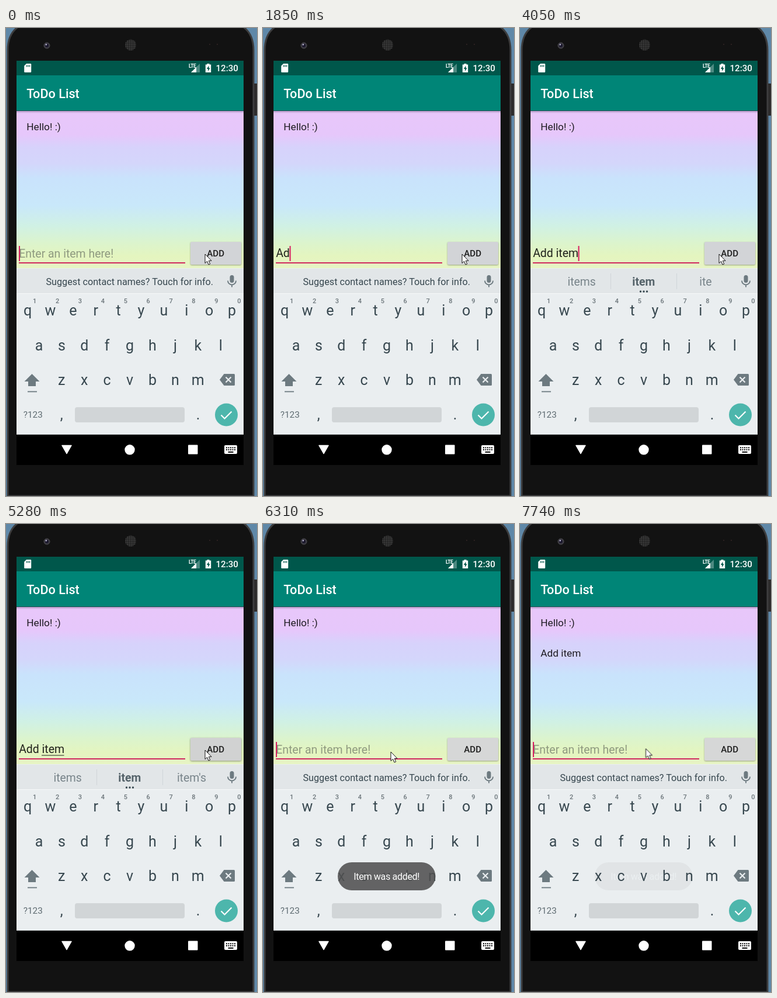
These frames come from a looping animation (430x801 px, 8 s). An HTML page:

```html
<!DOCTYPE html>
<html lang="en">
<head>
<meta charset="utf-8">
<title>ToDo List</title>
<style>
html, body { margin: 0; width: 100%; height: 100%; overflow: hidden; background: #111; }
body { position: relative; font-family: Roboto, sans-serif; }
svg { display: block; }
svg text { font-family: Roboto, sans-serif; }
.mid { text-anchor: middle; }
.med { font-weight: 500; }
.key { font-size: 25px; fill: #37474f; text-anchor: middle; }
.num { font-size: 11px; font-weight: 500; fill: #6a7479; text-anchor: middle; }
.item { font-size: 17.3px; fill: #1f1c22; }
.word { font-size: 19.4px; fill: #78848a; text-anchor: middle; }
.word.best { font-weight: 700; fill: #55636a; }
.icon { fill: #6d7a80; }

.hint, .typed, .caret, .under, .reel, .added, .mouse, .toast, .button {
  animation: 8s step-end infinite;
}
.hint { animation-name: hint; font-size: 19.45px; fill: #8f9a80; }
.typed {
  animation-name: type;
  position: absolute; left: 22.2px; top: 371.4px; height: 30px;
  font-size: 19.45px; line-height: 30px; color: #20221c;
  white-space: pre; overflow: hidden;
}
.caret { animation-name: caret, blink; fill: #d81b60; }
.under { animation-name: under; fill: #30332a; }
.reel { animation-name: reel; }
.added { animation-name: added; }
.mouse { animation-name: mouse; }
.toast { animation-name: toast; }
.button { animation-name: press; }

@keyframes hint {
  0%, 71% { opacity: 1; }
  15.875% { opacity: 0; }
}
@keyframes type {
  0%, 71%, 100% { width: 0; }
  15.875% { width: 12.7px; }
  19.625% { width: 23.7px; }
  25% { width: 34.7px; }
  35.25% { width: 44.2px; }
  38.25% { width: 50.5px; }
  42% { width: 60.9px; }
  48.75% { width: 80px; }
}
@keyframes caret {
  0%, 71%, 100% { transform: none; }
  15.875% { transform: translateX(12.6px); }
  19.625% { transform: translateX(23.5px); }
  25% { transform: translateX(34.6px); }
  31.875% { transform: translateX(39.4px); }
  35.25% { transform: translateX(44.1px); }
  38.25% { transform: translateX(50.2px); }
  42% { transform: translateX(60.8px); }
  48.75% { transform: translateX(77.6px); }
}
@keyframes blink {
  0%, 12.375%, 67.5%, 94.875%, 100% { opacity: 1; }
  7%, 56%, 86.875% { opacity: 0; }
}
@keyframes under {
  0%, 23.125%, 33.75%, 38.25%, 45.375%, 50.625%, 71%, 100% { transform: scaleX(0); }
  15.875% { transform: translateX(22px) scaleX(12.5); }
  21.25% { transform: translateX(22px) scaleX(23.5); }
  30% { transform: translateX(22px) scaleX(34); }
  36.75% { transform: translateX(61px) scaleX(5); }
  40.125% { transform: translateX(61px) scaleX(11); }
  46.875% { transform: translateX(61px) scaleX(21.5); }
  52.125% { transform: translateX(61px) scaleX(38.5); }
}
@keyframes reel {
  0%, 23.125%, 75.875%, 100% { transform: none; }
  15.875% { transform: translateY(-42px); }
  26.5% { transform: translateY(-84px); }
  33.75% { transform: translateY(-126px); }
  36.75% { transform: translateY(-168px); }
  38.25% { transform: translateY(-210px); }
  43.5% { transform: translateY(-252px); }
  52.125% { transform: translateY(-294px); }
}
@keyframes added {
  0% { opacity: 0; }
  80.375%, 100% { opacity: 1; }
}
@keyframes mouse {
  0% { transform: translate(341px, 387px); }
  74.375% { transform: translate(331px, 389px); }
  75.875% { transform: translate(300px, 392px); }
  77.375% { transform: translate(255px, 392px); }
  78.875% { transform: translate(219px, 390px); }
  80.375%, 100% { transform: translate(215.5px, 384.5px); }
}
@keyframes toast {
  0% { opacity: 0; }
  75.875% { opacity: .4; }
  77.375% { opacity: .8; }
  78.875% { opacity: 1; }
  94.875% { opacity: .55; }
  96.75%, 100% { opacity: .07; }
}
@keyframes press {
  0% { fill: #d2d4d7; filter: drop-shadow(0 1px 1px #0005); }
  66% { fill: #d1d2d2; filter: drop-shadow(0 1.5px 1.5px #0006); }
  67.5% { fill: #cbcccc; filter: drop-shadow(0 2px 2px #0007); }
  75.875%, 100% { fill: #d6d7d7; filter: drop-shadow(0 1px 1px #0005); }
}
</style>
</head>
<body>
<svg width="430" height="801" viewBox="0 0 430 801">
  <defs>
    <linearGradient id="sky" x2="0" y2="1">
      <stop offset="0" stop-color="#e8c7fa"/>
      <stop offset=".15" stop-color="#e6c7fb"/>
      <stop offset=".23" stop-color="#d7d2fb"/>
      <stop offset=".33" stop-color="#d4d6fb"/>
      <stop offset=".43" stop-color="#c9e3fc"/>
      <stop offset=".6" stop-color="#c9e8fa"/>
      <stop offset=".73" stop-color="#d0f1e4"/>
      <stop offset=".84" stop-color="#dcf4cc"/>
      <stop offset=".92" stop-color="#e4f5bf"/>
      <stop offset="1" stop-color="#e7f4c4"/>
    </linearGradient>
    <linearGradient id="shade" x2="0" y2="1">
      <stop stop-color="#403050" stop-opacity=".4"/>
      <stop offset="1" stop-color="#403050" stop-opacity="0"/>
    </linearGradient>
    <pattern id="mesh" width="3" height="3" patternUnits="userSpaceOnUse">
      <rect width="3" height="3" fill="#1b1b1b"/>
      <circle cx="1.5" cy="1.5" r=".9" fill="#565656"/>
    </pattern>
  </defs>

  <!-- phone -->
  <rect width="430" height="801" fill="#5f88a8"/>
  <rect x="424" y="95" width="6" height="55" fill="#2c2b2b"/>
  <path d="M3 801V38Q3 8 24-4H403Q424 8 424 38V801Z" fill="#121212" stroke="#3d3d3e" stroke-width="3"/>
  <circle cx="70" cy="30" r="5" fill="#36343d" stroke="#4c4b50"/>
  <circle cx="70" cy="30" r="2.6" fill="#17142b"/>
  <circle cx="68.8" cy="28.4" r="1.3" fill="#b9b6d2"/>
  <circle cx="213.5" cy="29" r="9.5" fill="url(#mesh)"/>
  <path d="M348 28h2M361 28h2" stroke="#2b2020" stroke-width="2"/>

  <!-- status and title bars -->
  <rect x="18" y="142" width="389" height="270" fill="url(#sky)"/>
  <rect x="18" y="141" width="389" height="5" fill="url(#shade)"/>
  <rect x="18" y="56" width="389" height="26" fill="#00574b"/>
  <rect x="18" y="81" width="389" height="60.5" fill="#008577"/>
  <path d="M35 61h7q1.2 0 1.2 1.2v12.6q0 1.2-1.2 1.2h-9.600q-1.2 0-1.2-1.2v-10z" fill="#fff"/>
  <path d="M35.500 63.500v3M38 63.500v3M40.500 63.500v3" stroke="#00574b" stroke-width="1.3"/>
  <path d="M332 61V76H317Z" fill="#4d8a82"/>
  <path d="M326 67V76H317Z" fill="#fff"/>
  <text x="313" y="67.500" font-size="8.500" fill="#fff" font-weight="700" letter-spacing="-.5">LTE</text>
  <path d="M344.500 61h4v1.500h2.700v13.500h-9.400v-13.500h2.700z" fill="#fff"/>
  <path d="M347.500 64.500l-3.700 5.500h2.300v4l3.500-5.500h-2.100z" fill="#00574b"/>
  <text class="med" x="359.500" y="74.300" font-size="15.1" fill="#fff">12:30</text>
  <text class="med" x="35.200" y="120" font-size="21.6" fill="#fff">ToDo List</text>

  <!-- list and entry row -->
  <text class="item" x="35.200" y="174.500">Hello! :)</text>
  <text class="item added" x="35.200" y="226.500">Add item</text>
  <text class="hint" x="22.200" y="393">Enter an item here!</text>
  <rect class="under" x="0" y="395.400" width="1" height="1.1"/>
  <rect x="22" y="401" width="285" height="2" fill="#d0285f"/>
  <rect class="caret" x="22" y="373" width="2" height="26"/>
  <rect class="button" x="316" y="366" width="87" height="39" rx="2"/>
  <text class="mid med" x="359.200" y="390.500" font-size="15.1" fill="#1c1c1c">ADD</text>

  <!-- keyboard -->
  <rect x="18" y="411" width="389" height="285" fill="#eaeef0"/>
  <rect x="18" y="412" width="389" height="42" fill="#e2e6e8"/>
  <path d="M18 454.500H407" stroke="#f6f8f9"/>
  <path d="M18 695.500H407" stroke="#cfd3d5"/>
  <svg x="0" y="412" width="430" height="42" viewBox="0 0 430 42">
    <g class="reel" id="reel">
      <text x="68.500" y="28" font-size="16.2" fill="#37474f">Suggest contact names? Touch for info.</text>
    </g>
  </svg>
  <rect class="icon" x="383.500" y="423" width="7" height="13" rx="3.500"/>
  <path d="M380 432.500a7 7 0 0 0 14 0M387 439.500v4" fill="none" stroke="#6d7a80" stroke-width="1.9"/>
  <g id="keys"></g>
  <path class="icon" d="M44.500 592L57.500 605H51V613H38V605H31.500Z"/>
  <rect class="icon" x="37" y="621.500" width="16" height="1.800"/>
  <path class="icon" d="M373.500 592H390.500Q392 592 392 593.500V610.500Q392 612 390.500 612H373.500L366 602Z"/>
  <path d="M376.500 597.500l9 9m0-9l-9 9" stroke="#eaeef0" stroke-width="2.2"/>
  <text x="29.800" y="667" font-size="15.300" fill="#5f6c72">?123</text>
  <rect x="118" y="649" width="188" height="26" rx="4" fill="#d1d5d7"/>
  <circle cx="377.500" cy="662" r="19.500" fill="#4db6ac"/>
  <path d="M368.500 662.500l6 6 12-12" fill="none" stroke="#fff" stroke-width="2.2"/>

  <!-- navigation bar -->
  <rect x="18" y="696" width="389" height="52" fill="#000"/>
  <g fill="#fff">
    <path d="M96 714.500H112L104 728.500Z" stroke="#fff" stroke-width="1.5" stroke-linejoin="round"/>
    <circle cx="212" cy="721.800" r="8.700"/>
    <rect x="312" y="713.500" width="16.500" height="16" rx="1"/>
    <rect x="374" y="714" width="22" height="15" rx="2"/>
  </g>
  <path d="M377 718.300H394M377 721.700H394" stroke="#000" stroke-width="2" stroke-dasharray="2 1.500"/>
  <path d="M380.500 725.800H389.500" stroke="#000" stroke-width="2"/>

  <g class="toast">
    <rect x="128" y="579" width="167.500" height="48" rx="24" fill="#505050" fill-opacity=".88"/>
    <text class="mid" x="211.700" y="609" font-size="16.2" letter-spacing="-.4" fill="#fff">Item was added!</text>
  </g>
  <path class="mouse" d="M0 0V15.500L3.600 12.200L6 18L8.700 16.900L6.300 11.300H11Z" fill="#fff" stroke="#111" stroke-linejoin="round"/>
</svg>
<div class="typed">Add item</div>

<script>
const NS = "http://www.w3.org/2000/svg";
const PITCH = 38.9, ROW = 42;

function add(parent, tag, attrs, text = "") {
  const el = document.createElementNS(NS, tag);
  for (const name in attrs) el.setAttribute(name, attrs[name]);
  el.textContent = text;
  parent.append(el);
}

const keys = document.getElementById("keys");
function keyRow(chars, x, y, cls = "key") {
  [...chars].forEach((c, i) => add(keys, "text", { class: cls, x: x + i * PITCH, y }, c));
}
keyRow("qwertyuiop", 37, 492);
keyRow("1234567890", 49.2, 471, "num");
keyRow("asdfghjkl", 56.5, 552);
keyRow("zxcvbnm", 95.3, 611);
keyRow(",", 95.3, 670);
keyRow(".", 329, 670);

// Each row of the reel is one state of the suggestion strip.
const reel = document.getElementById("reel");
const words = [
  ["And", "A", "All"],
  ["Ads", "Add", "Added"],
  ["to", "a", "the"],
  ["is", "I", "I'm"],
  ["if", "it", "of"],
  ["items", "item", "ite"],
  ["items", "item", "item's"]
];
words.forEach((set, i) => {
  const top = (i + 1) * ROW;
  set.forEach((w, n) => add(reel, "text",
    { class: n === 1 ? "word best" : "word", x: 105.7 + n * 106.1, y: top + 29 }, w));
  for (const x of [155.5, 268.5])
    add(reel, "path", { d: `M${x} ${top + 8}v27`, stroke: "#d0d5d8" });
  for (const x of [206.5, 212, 217.5])
    add(reel, "circle", { cx: x, cy: top + 39, r: 1.7, fill: "#37474f" });
});
</script>
</body>
</html>
```
